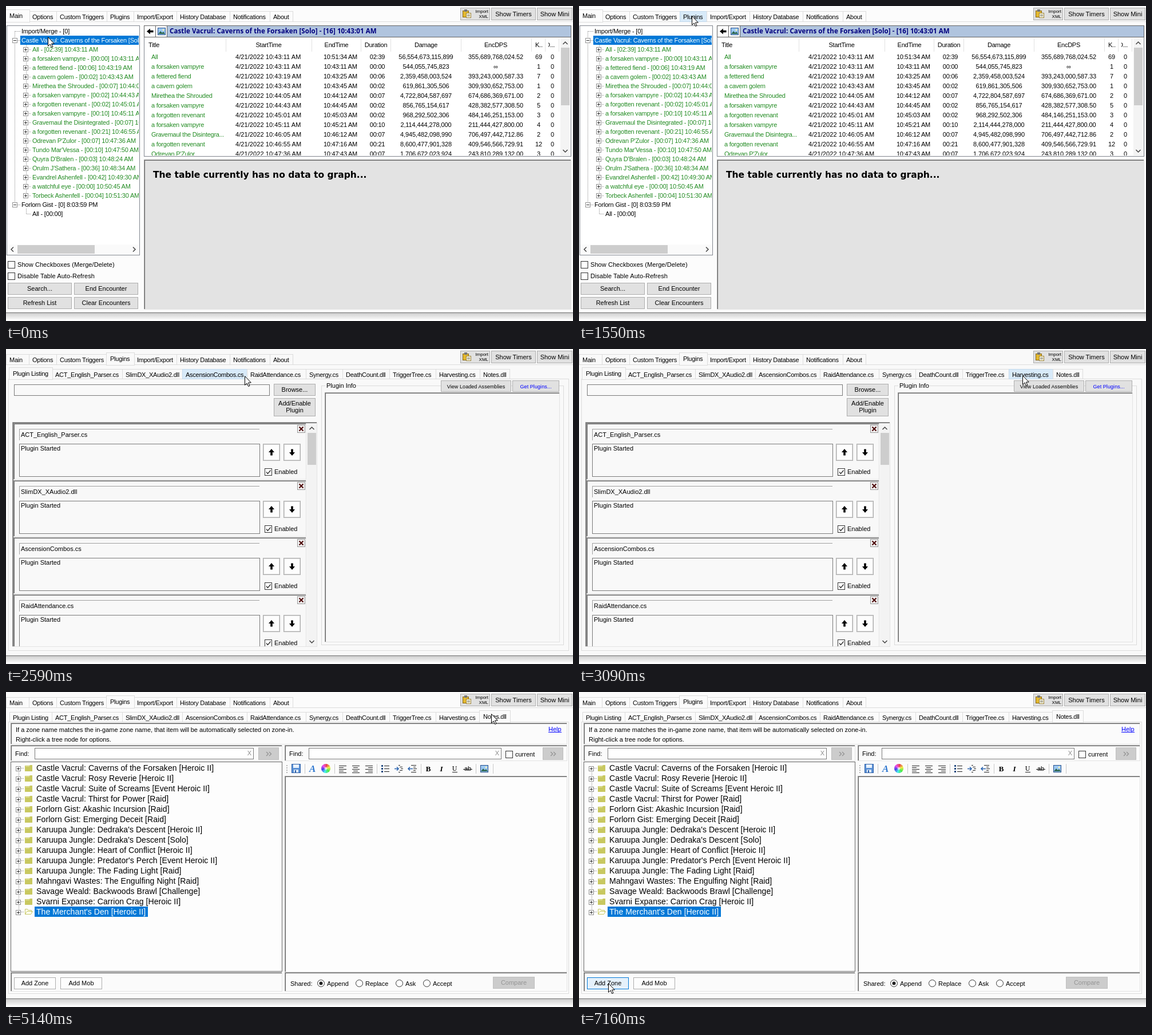
Recreate the animation shown at these times as an HTML page. Size 991 by 552 pixels, loop 8000 ms.

```html
<!DOCTYPE html>
<html lang="en">
<head>
<meta charset="utf-8">
<title>Parser notes plugin</title>
<style>
html, body { margin: 0; width: 100%; height: 100%; overflow: hidden; background: #fcfcfc; }
svg { display: block; }
text { font: 11px "Liberation Sans", Arial, sans-serif; white-space: pre; }
.tight { letter-spacing: -.25px; }
.tree { letter-spacing: -.19px; }
.date { letter-spacing: .07px; }
.num { letter-spacing: -.1px; }
.small { font-size: 9px; letter-spacing: .07px; }
.tiny { font-size: 8px; }
.zone { font-size: 14px; letter-spacing: .06px; }
.title { font: bold 11.5px "Open Sans", "Noto Sans", sans-serif; letter-spacing: .1px; }
.graph { font: bold 15.5px "DejaVu Sans", sans-serif; }
.serif { font: bold 13px "Liberation Serif", serif; }
.letter { font: italic bold 17px "Liberation Serif", serif; }
.italic { font: italic bold 13px "Liberation Serif", serif; }
.thin { font: 12px "Liberation Serif", serif; }
rect, .crisp { shape-rendering: crispEdges; }
</style>
</head>
<body>
<svg id="stage" width="991" height="552" viewBox="0 0 991 552"></svg>
<script>
const LOOP = 8000;
const BLUE = '#0078d7', GREEN = '#228b22', DARK = '#696969', FRAME = '#646464', EDGE = '#dcdcdc';

// start, view, cursor x, cursor y, extras
const steps = [
  [0, 'main', 73, 54],
  [520, 'main', 73, 54, { tip: 1 }],
  [1030, 'main', 173, 27],
  [1550, 'main', 197, 17, { hotTab: 3 }],
  [2070, 'list', 197, 17],
  [2590, 'list', 417, 47, { hotSub: 3 }],
  [3090, 'list', 775, 46, { hotSub: 8 }],
  [3600, 'list', 838, 38, { hotSub: 9 }],
  [4120, 'list', 848, 38, { hotSub: 9 }],
  [5140, 'notes', 848, 38],
  [5640, 'notes', 591, 96, { beam: 1 }],
  [6140, 'notes', 198, 305, { hotFind: 1 }],
  [6660, 'notes', 49, 476],
  [7160, 'notes', 51, 510, { hotAdd: 1 }]
];

const zoneTitle = 'Castle Vacrul: Caverns of the Forsaken [Solo] - [16] 10:43:01 AM';

// name, start, duration, end, damage, dps, kills
const fights = [
  'All|10:43:11|02:39|10:51:34|56,554,673,115,899|355,689,768,024.52|69',
  'a forsaken vampyre|10:43:11|00:00|10:43:11|544,055,745,823|∞|1',
  'a fettered fiend|10:43:19|00:06|10:43:25|2,359,458,003,524|393,243,000,587.33|7',
  'a cavern golem|10:43:43|00:02|10:43:45|619,861,305,506|309,930,652,753.00|1',
  'Mirethea the Shrouded|10:44:05|00:07|10:44:12|4,722,804,587,697|674,686,369,671.00|2',
  'a forsaken vampyre|10:44:43|00:02|10:44:45|856,765,154,617|428,382,577,308.50|5',
  'a forgotten revenant|10:45:01|00:02|10:45:03|968,292,502,306|484,146,251,153.00|3',
  'a forsaken vampyre|10:45:11|00:10|10:45:21|2,114,444,278,000|211,444,427,800.00|4',
  'Gravemaul the Disintegrated|10:46:05|00:07|10:46:12|4,945,482,098,990|706,497,442,712.86|2',
  'a forgotten revenant|10:46:55|00:21|10:47:16|8,600,477,901,328|409,546,566,729.91|12',
  "Odrevan P'Zulor|10:47:36|00:07|10:47:43|1,706,672,023,924|243,810,289,132.00|3",
  "Tundo Mar'Vessa|10:47:50|00:10",
  "Quyra D'Bralen|10:48:24|00:03",
  "Orulm J'Sathera|10:48:34|00:36",
  'Evandrel Ashenfell|10:49:30|00:42',
  'a watchful eye|10:50:45|00:00',
  'Torbeck Ashenfell|10:51:30|00:04'
].map(s => s.split('|'));

const zones = [
  'Castle Vacrul: Caverns of the Forsaken [Heroic II]', 'Castle Vacrul: Rosy Reverie [Heroic II]',
  'Castle Vacrul: Suite of Screams [Event Heroic II]', 'Castle Vacrul: Thirst for Power [Raid]',
  'Forlorn Gist: Akashic Incursion [Raid]', 'Forlorn Gist: Emerging Deceit [Raid]',
  "Karuupa Jungle: Dedraka's Descent [Heroic II]", "Karuupa Jungle: Dedraka's Descent [Solo]",
  'Karuupa Jungle: Heart of Conflict [Heroic II]', "Karuupa Jungle: Predator's Perch [Event Heroic II]",
  'Karuupa Jungle: The Fading Light [Raid]', 'Mahngavi Wastes: The Engulfing Night [Raid]',
  'Savage Weald: Backwoods Brawl [Challenge]', 'Svarni Expanse: Carrion Crag [Heroic II]',
  "The Merchant's Den [Heroic II]"
];

const topTabs = [['Main', 0], ['Options', 40], ['Custom Triggers', 88], ['Plugins', 176], ['Import/Export', 223],
  ['History Database', 298], ['Notifications', 391], ['About', 461], ['', 501]];
const subTabs = [['Plugin Listing', 6], ['ACT_English_Parser.cs', 80], ['SlimDX_XAudio2.dll', 203],
  ['AscensionCombos.cs', 308], ['RaidAttendance.cs', 421], ['Synergy.cs', 524], ['DeathCount.dll', 588],
  ['TriggerTree.cs', 670], ['Harvesting.cs', 751], ['Notes.dll', 828], ['', 880]];

const fill = (x, y, w, h, c) => `<rect x="${x}" y="${y}" width="${w}" height="${h}" fill="${c}"/>`;
const box = (x, y, w, h, c = 'none', line = '#7a7a7a') =>
  `<rect x="${x + .5}" y="${y + .5}" width="${w - 1}" height="${h - 1}" fill="${c}" stroke="${line}"/>`;
const text = (x, y, s, cls = '', c = '#000', anchor = 'start') =>
  `<text x="${x}" y="${y}" class="${cls}" fill="${c}" text-anchor="${anchor}">${s}</text>`;
const mid = (x, y, s, cls, c) => text(x, y, s, cls, c, 'middle');
const path = (d, c = '#000', w = 1, f = 'none', more = '') =>
  `<path d="${d}" stroke="${c}" stroke-width="${w}" fill="${f}" ${more}/>`;
const dots = d => path(d, '#8c8c8c', 1, 'none', 'stroke-dasharray="1 1" class="crisp"');
const clip = (x, y, w, h, s) =>
  `<svg x="${x}" y="${y}" width="${w}" height="${h}" viewBox="${x} ${y} ${w} ${h}">${s}</svg>`;
const button = (x, y, w, h, s = '', c = '#e1e1e1', line = '#adadad', ink = '#000', cls = '') =>
  box(x, y, w, h, c, line) + mid(x + w / 2, y + h / 2 + 3.5, s, cls, ink);
const check = (x, y, on) => box(x, y, 13, 13, '#fff', '#333') +
  (on ? path(`M${x + 3} ${y + 6.5}l2.5 3 5-6`, '#222', 1.2) : '');
const plus = (x, y, open) => box(x - 4, y - 4, 9, 9, '#fff', '#919191') + fill(x - 2, y, 5, 1, '#333') +
  (open ? '' : fill(x, y - 2, 1, 5, '#333'));
const chevron = (x, y, dx, dy) => path(dx
  ? `M${x - 2 * dx} ${y - 4}l${4 * dx} 4 ${-4 * dx} 4`
  : `M${x - 4} ${y - 2 * dy}l4 ${4 * dy} 4 ${-4 * dy}`, '#444', 1.5);
const sunk = (x, y, w, h, c = 'none') => fill(x, y, w, h, c) + fill(x, y, w, 1, '#a0a0a0') +
  fill(x, y, 1, h, '#a0a0a0') + fill(x + 1, y + 1, w - 2, 1, DARK) + fill(x + 1, y + 1, 1, h - 2, DARK) +
  fill(x, y + h - 1, w, 1, '#e3e3e3') + fill(x + w - 1, y, 1, h, '#e3e3e3');
const arrow = (x, y, turn) =>
  `<path d="M0-6L5 0H1.8V5.5H-1.8V0H-5Z" transform="translate(${x} ${y}) rotate(${turn})"/>`;
const picture = (x, y) => box(x, y, 14, 13, '#9cc8f2', '#27508c') +
  path(`M${x + 1} ${y + 11}l4-5 3 3 2-2 3 4z`, 'none', 0, '#2c6650') +
  `<circle cx="${x + 10}" cy="${y + 4}" r="1.5" fill="#fff4b0"/>`;

function tabs(list, top, base, sel, hot, bg, lead) {
  const one = ([label, x], i) => {
    const on = i === sel, w = list[i + 1][1] - x + 1;
    const y = on ? top - 3 : top, h = on ? base - y + 1 : base - y;
    return box(on ? x - 1 : x, y, on ? w + 2 : w, h + 1, i === hot ? '#d8eaf9' : bg, i === hot ? '#c3d9ec' : EDGE) +
      (on ? fill(x, base, w, 1, bg) : '') + text(x + lead, top + (on ? 12 : 14), label, 'tight');
  };
  const all = list.slice(0, -1).map(one);
  const front = all.splice(sel, 1);
  return all.join('') + front;
}

function chrome(bg, sel, hot) {
  return fill(0, 0, 991, 552, bg) + fill(0, 27, 991, 1, EDGE) +
    tabs(topTabs, 9, 27, sel, hot, bg, 6) +
    button(794, 3, 52, 22) + box(798, 8, 11, 12, '#e4b92f', '#866718') + fill(801, 6, 5, 4, '#777') +
    box(804, 12, 9, 9, '#fff7d9', '#9a8443') + fill(806, 15, 5, 1, '#777') + fill(806, 17, 5, 1, '#777') +
    text(843, 12, 'Import', 'tiny', '#000', 'end') + text(843, 21, 'XML', 'tiny', '#000', 'end') +
    button(848, 3, 78, 22, 'Show Timers') + button(928, 3, 62, 22, 'Show Mini') +
    '<linearGradient id="shade" x2="0" y2="1"><stop stop-color="#cfcfcf"/><stop offset="1" stop-color="#f6f6f6"/></linearGradient>' +
    fill(0, 537, 991, 1, '#6e6e6e') + fill(0, 538, 991, 11, 'url(#shade)') + fill(0, 549, 991, 3, '#fdfdfd');
}

function encounterTree() {
  let s = dots('M15.5 44V348M16 44.5h9M16 60.5h9M16 348.5h9M35.5 68V332M35.5 355V364M36 364.5h8');
  s += fill(25, 52, 208, 16, BLUE) + plus(15, 60, true) + plus(15, 348, true);
  s += text(27, 48, 'Import/Merge - [0]', 'tree') + text(27, 64, zoneTitle, 'tree', '#fff');
  fights.forEach(([name, start, dur], i) => {
    const y = 76 + 16 * i;
    s += dots(`M36 ${y + .5}h8`) + plus(34, y) + text(46, y + 4, `${name} - [${dur}] ${start} AM`, 'tree', GREEN);
  });
  s += text(27, 352, 'Forlorn Gist - [0] 8:03:59 PM', 'tree') + text(46, 368, 'All - [00:00]', 'tree');
  return box(1, 34, 233, 403, '#fff', '#828790') + clip(2, 35, 230, 382, s) +
    fill(2, 418, 231, 17, '#fafafa') + fill(20, 419, 135, 15, '#cdcdcd') + chevron(11, 426.5, -1, 0) + chevron(224, 426.5, 1, 0);
}

function fightTable() {
  let s = [384, 534, 620, 672, 795, 918, 942, 966].map(x => fill(x, 56, 1, 24, '#e2e2e2')).join('');
  s += text(249, 72, 'Title', 'tight');
  [['StartTime', 459], ['EndTime', 577.5], ['Duration', 646.5], ['Damage', 734], ['EncDPS', 856]]
    .forEach(([h, x]) => { s += mid(x, 72, h, 'tight'); });
  s += text(925, 72, 'K..', 'tight') + clip(948, 60, 16, 18, text(943, 72, 'D...', 'tight'));
  fights.slice(0, 11).forEach(([name, start, dur, end, dmg, dps, kills], i) => {
    const y = 93 + 17 * i;
    const label = name.length > 25 ? name.slice(0, 24) + '...' : name;
    s += text(254, y, label, 'tight', GREEN) + text(401, y, `4/21/2022 ${start} AM`, 'date') +
      mid(584.5, y, `${end} AM`, 'tight') + mid(649, y, dur, 'tight') + mid(734, y, dmg, 'num') +
      mid(856, y, dps, 'num') + mid(931, y, kills) + mid(955, y, '0');
  });
  return box(241, 34, 747, 230, '#fff', '#828790') + clip(242, 55, 727, 207, s) +
    fill(969, 56, 18, 206, '#f4f4f4') + fill(970, 73, 15, 101, '#cdcdcd') + chevron(977.5, 65, 0, -1) + chevron(977.5, 254, 0, 1) +
    box(241, 34, 21, 21, '#fff', FRAME) + arrow(252, 44.5, -90) +
    box(261, 34, 21, 21, '#fff', FRAME) + picture(265, 38) +
    box(281, 34, 707, 21, '#b0c4de', FRAME) + text(286, 48, zoneTitle, 'title', '#000080');
}

function mainView(o) {
  let s = chrome('#fcfcfc', 0, o.hotTab) + encounterTree() + fightTable();
  s += check(3, 447) + text(20, 457, 'Show Checkboxes (Merge/Delete)', 'date') +
    check(3, 467) + text(20, 477, 'Disable Table Auto-Refresh', 'date');
  s += button(3, 485, 112, 21, 'Search...') + button(119, 485, 112, 21, 'End Encounter') +
    button(3, 510, 112, 21, 'Refresh List') + button(119, 510, 112, 21, 'Clear Encounters');
  s += sunk(241, 269, 747, 263, '#e3e3e3') + text(257, 301, 'The table currently has no data to graph...', 'graph');
  if (o.tip) s += box(19, 50, 321, 23, '#fff', '#767676') + text(27, 64, zoneTitle, 'tree', '#575757');
  return s;
}

function pluginPage(bg, sel, hot) {
  return chrome(bg, 3) + box(4, 52, 980, 477, bg, EDGE) + tabs(subTabs, 35, 52, sel, hot, bg, 6);
}

function pluginItem(name, i) {
  const y = 130 + 100 * i;
  return sunk(13, y, 512, 99, '#f8f8f8') + fill(23, y + 10, 420, 1, '#a0a0a0') + fill(23, y + 10, 1, 20, '#a0a0a0') +
    text(26, y + 24, name) + box(23, y + 36, 421, 58, '#f9f9f9') + text(26, y + 48, 'Plugin Started') +
    box(509, y + 3, 14, 14, '#f0f0f0', '#999') + path(`M512.5 ${y + 6.5}l7 7m0-7l-7 7`, '#4c0808', 2) +
    [449, 485].map((x, k) => box(x, y + 36, 30, 30, '#fdfdfd', '#adadad') +
      box(x + 1, y + 37, 28, 28, 'none', '#d4d4d4') + arrow(x + 15, y + 51, 180 * k)).join('') +
    check(452, y + 79, true) + text(469, y + 89, 'Enabled');
}

function listView(o) {
  const bg = '#f9f9f9';
  const names = subTabs.slice(1, 5).map(t => t[0]);
  return pluginPage(bg, 0, o.hotSub) + box(14, 62, 447, 20, bg) + button(468, 61, 73, 21, 'Browse...') +
    button(468, 86, 73, 32) + mid(504.5, 99, 'Add/Enable') + mid(504.5, 111, 'Plugin') +
    sunk(11, 128, 533, 394, bg) + clip(13, 130, 512, 391, names.map(pluginItem).join('')) +
    fill(526, 130, 17, 391, '#f3f3f3') + fill(527, 147, 15, 56, '#cdcdcd') + chevron(534.5, 139, 0, -1) + chevron(534.5, 513, 0, 1) +
    box(551, 64, 424, 455, 'none', EDGE) + fill(558, 60, 54, 10, bg) + text(560, 68, 'Plugin Info') +
    button(760, 55, 123, 20, 'View Loaded Assemblies', '#e1e1e1', '#adadad', '#000', 'small') +
    button(885, 55, 82, 20, 'Get Plugins...', '#e1e1e1', '#adadad', '#00f', 'small') +
    sunk(557, 76, 411, 438, '#f8f8f8');
}

function zoneTree() {
  let s = dots('M22.5 134V385');
  zones.forEach((z, i) => {
    const y = 133 + 18 * i, last = i === zones.length - 1;
    if (last) s += fill(50, y - 9, 198, 18, BLUE);
    s += dots(`M22 ${y + .5}h10`) + plus(21, y + 1) + (last
      ? path(`M33.5 ${y + 4.5}v-9h4l1 2h6v3M33.5 ${y + 4.5}l3-5h10l-3 5z`, '#c8c86a', 1, '#fffff0')
      : path(`M33 ${y - 4}h8l1-1h4v11h-13z`, 'none', 0, '#c8c860') + fill(34, y - 3, 7, 1, '#e5e5a4')) +
      text(53, y + 5, z, 'zone', last ? '#fff' : '#000');
  });
  return s;
}

const lines = (x, offs, y = 129) =>
  offs.map(([a, w], i) => fill(x + a, y + 3 * i, w, 1, '#222')).join('');

function toolbar() {
  let s = [128, 132, 136, 140].map(y => fill(490, y, 2, 2, '#b5b5b5')).join('');
  s += [522, 574, 648, 725, 821, 851].map(x => fill(x, 126, 1, 17, '#c8c8c8')).join('');
  s += box(499, 126, 16, 16, '#5b91d6', '#2c5fa8') + fill(502, 127, 10, 6, '#e9f2fc') + fill(503, 136, 8, 5, '#dce8f5') + fill(505, 137, 2, 4, '#2c5fa8');
  s += text(530, 140, 'A', 'letter', '#2f78d0');
  for (let i = 0; i < 12; i++)
    s += `<path d="M559 134L559 126A8 8 0 0 1 563.2 127.2Z" transform="rotate(${30 * i} 559 134)" fill="hsl(${30 * i} 80% 60%)"/>`;
  s += '<circle cx="559" cy="134" r="2.5" fill="#fff" opacity=".6"/>';
  const wide = [[0, 13], [0, 8], [0, 13], [0, 8], [0, 13]];
  s += lines(582, wide) + lines(605, wide.map(([, w]) => [(13 - w) / 2 | 0, w])) + lines(628, wide.map(([, w]) => [13 - w, w]));
  [128, 133, 138].forEach(y => { s += fill(656, y, 3, 3, '#234a80') + fill(661, y + 1, 9, 1, '#222'); });
  s += lines(684, [[2, 3], [4, 5], [6, 4], [4, 5], [2, 3]], 128) + path('M679 134.5h7m-3-3l3 3-3 3', '#2c65b0', 1.6) +
    lines(704, [[4, 9], [8, 4], [8, 6], [8, 4], [4, 9]], 128) + path('M711 134.5h-8m3-3l-3 3 3 3', '#2c65b0', 1.6);
  s += mid(738, 139, 'B', 'serif') + mid(761, 139, 'I', 'italic') + mid(784, 138, 'U', 'thin') + fill(780, 140, 9, 1, '#222') +
    mid(807, 138, 'ab') + fill(799, 135, 16, 1, '#222') + picture(829, 128);
  return s;
}

function notesView(o) {
  const bg = '#fbfbfb';
  const grey = (x, y, w, h, t) => button(x, y, w, h, t, '#cccccc', '#bfbfbf', '#949494');
  const next = x => grey(x, 97, 36, 22) + path(`M${x + 14} 105l3.5 3.5-3.5 3.5m5-7l3.5 3.5-3.5 3.5`, '#949494', 1.4);
  let s = pluginPage(bg, 9) + sunk(8, 54, 973, 38, bg) +
    text(17, 70, 'If a zone name matches the in-game zone name, that item will be automatically selected on zone-in.') +
    text(17, 87, 'Right-click a tree node for options.') + text(948, 69, 'Help', '', '#00f') + fill(948, 70, 23, 1, '#00f');
  s += [[8, 475], [487, 494]].map(([x, w]) => sunk(x, 93, w, 28, bg) + sunk(x, 491, w, 34, bg)).join('');
  s += text(16, 112, 'Find:') + box(50, 98, 383, 20, '#fff') + mid(425.5, 111, 'X', '', '#8a8a8a') + next(441);
  s += text(495, 112, 'Find:') + box(529, 98, 337, 20, '#fff', o.hotFind ? '#5aa3dc' : '#7a7a7a') + mid(858.5, 111, 'X', '', '#8a8a8a') +
    check(873, 103) + text(890, 113, 'current') + next(938);
  s += box(8, 122, 475, 368, '#fdfdfd', FRAME) + zoneTree() + toolbar() + sunk(487, 147, 494, 344, '#fdfdfd');
  s += button(14, 500, 73, 21, 'Add Zone', o.hotAdd ? '#e5f1fb' : '#fdfdfd', o.hotAdd ? BLUE : '#adadad') +
    button(95, 500, 73, 21, 'Add Mob', '#fdfdfd');
  s += text(497, 515, 'Shared:');
  [['Append', 550.5], ['Replace', 617.5], ['Ask', 687.5], ['Accept', 735.5]].forEach(([t, x], i) => {
    s += `<circle cx="${x}" cy="510.5" r="6" fill="#fff" stroke="#333"/>` +
      (i ? '' : `<circle cx="${x}" cy="510.5" r="3" fill="#222"/>`) + text(x + 10.5, 515, t);
  });
  return s + grey(851, 499, 73, 21, 'Compare');
}

const pointer = (x, y, beam) => beam
  ? path(`M${x} ${y + .5}h3m1 0h3M${x + 3.5} ${y + 1}v14M${x} ${y + 15.5}h3m1 0h3`)
  : `<path transform="translate(${x} ${y})" d="M.5.6V16.3L4.1 12.9 6.6 18.5 9 17.5 6.5 12H11.3Z" fill="#fff" stroke="#000"/>`;

const views = { main: mainView, list: listView, notes: notesView };
const stage = document.getElementById('stage');
let shown = -1;

function draw(now) {
  const t = now % LOOP;
  const i = steps.findLastIndex(s => s[0] <= t);
  if (i !== shown) {
    const [, view, x, y, o = {}] = steps[i];
    stage.innerHTML = views[view](o) + pointer(x, y, o.beam);
    shown = i;
  }
}

const begin = performance.now();
function tick() {
  draw(performance.now() - begin);
  requestAnimationFrame(tick);
}
tick();
</script>
</body>
</html>
```
